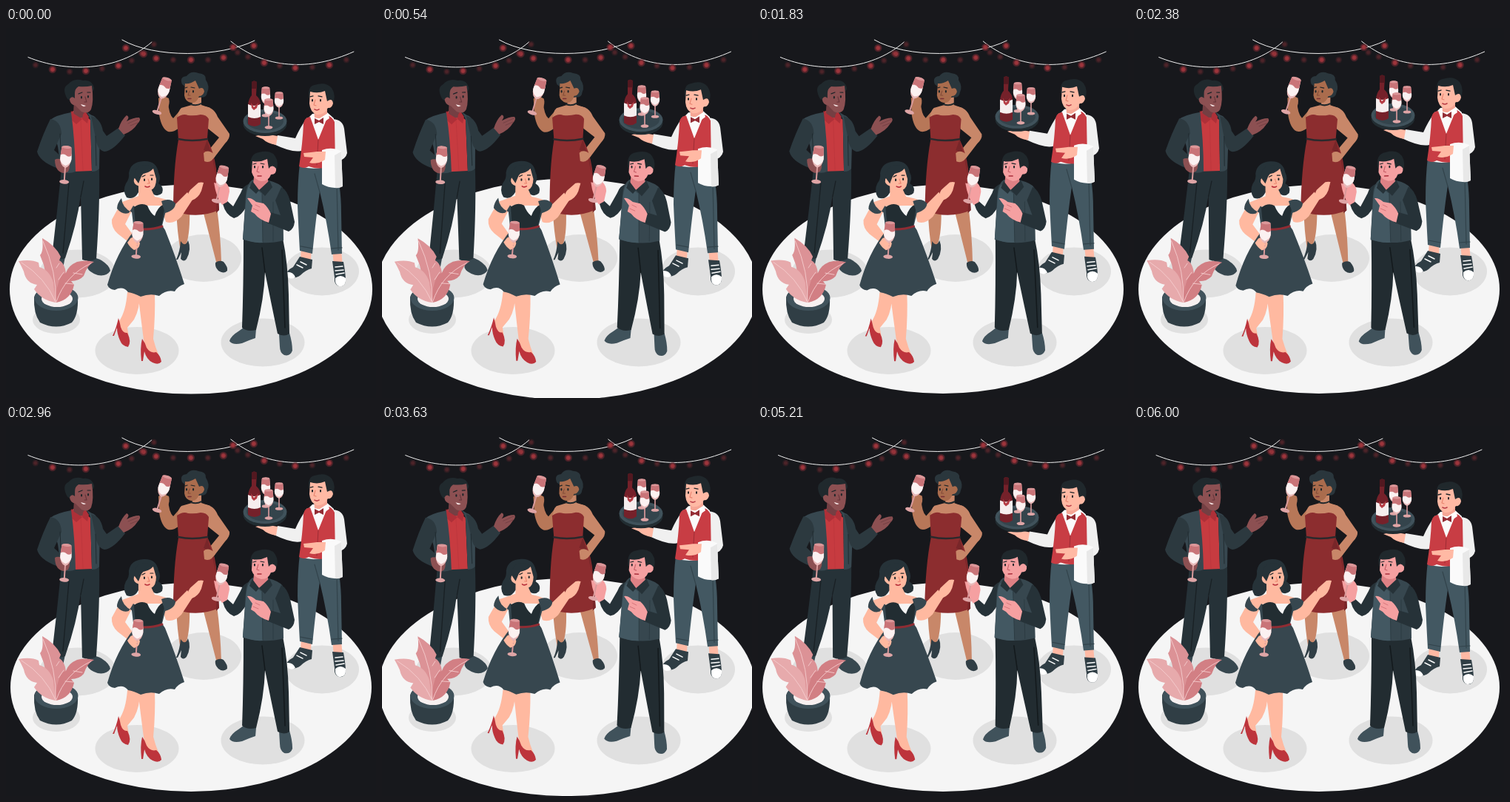
An HTML page that plays this animation: 500x500 px, repeating every 6.04 s.

```html
<!DOCTYPE html>
<html lang="en">
<head>
<meta charset="utf-8">
<title>Party</title>
<style>
html, body { margin: 0; width: 100%; height: 100%; overflow: hidden; background: #17181c; }
svg { display: block; width: 100%; height: 100%; }
.line { fill: none; stroke-linecap: round; stroke-linejoin: round; }
.ink { fill: none; stroke: #1c2428; stroke-linecap: round; }
</style>
</head>
<body>
<svg viewBox="0 0 500 500">
<defs>
  <radialGradient id="glow">
    <stop offset="0" stop-color="#a8383e"/>
    <stop offset=".5" stop-color="#8e3138"/>
    <stop offset=".65" stop-color="#702830" stop-opacity=".75"/>
    <stop offset="1" stop-color="#702830" stop-opacity=".4"/>
  </radialGradient>
  <g id="glass">
    <path d="M0 27V48" stroke="#d99a9b" stroke-width="2"/>
    <ellipse cy="48" rx="6.5" ry="2.8" fill="#dfa5a6"/>
    <path d="M-6.5 1L-7.8 16Q-7 27 0 29Q7 27 7.8 16L6.5 1Q0-2-6.5 1Z" fill="#e9b9b9"/>
    <path d="M-7.2 10Q0 13 7.2 10L7.6 18Q6 24 0 26Q-6 24-7.6 18Z" fill="#fbf1f1"/>
    <path d="M-6.5 1L-7.4 12Q-3 9 0 12T7.4 12L6.5 1Q0-2-6.5 1Z" fill="#c97478"/>
    <ellipse cy="1" rx="6.3" ry="2" fill="#dc9799"/>
  </g>
</defs>

<ellipse id="floor" cx="250" cy="353" rx="244" ry="141" fill="#f5f5f5"/>
<g fill="#e0e0e0">
  <ellipse cx="177" cy="436" rx="56.5" ry="32"/>
  <ellipse cx="347" cy="425" rx="56.5" ry="32.5"/>
  <ellipse cx="427" cy="329" rx="50" ry="32.5"/>
  <ellipse cx="267" cy="311" rx="51" ry="32"/>
  <ellipse cx="97" cy="332" rx="52" ry="32.5"/>
  <ellipse cx="68" cy="394" rx="32" ry="19"/>
</g>

<g id="garland">
  <g class="line" stroke="#f0f0f0" stroke-width="1">
    <path d="M30 39.500C80 60 150 60 197 19"/>
    <path d="M157 16C200 41 290 40 336 17"/>
    <path d="M304 18C350 55 410 59 470 32"/>
  </g>
  <g id="bulbs" fill="url(#glow)"></g>
</g>

<!-- man in the open jacket -->
<g id="host">
  <path d="M63 307L80 309L77 324L60 320Z" fill="#37474f"/>
  <path d="M110 312Q119 308 129 314Q140 321 141 328Q136 336 124 334Q112 330 110 324Z" fill="#37474f"/>
  <path d="M75 190L126 190Q127 240 122 312Q112 317 103 313L101 226Q96 265 80 311Q72 315 62 309Q69 250 75 190Z" fill="#263238"/>
  <path class="line" d="M101 228L105 207M85 210L77 304" stroke="#192024" stroke-width="1.300"/>
  <path d="M90 112L87 122L92 194L116 193L114 124L104 116Z" fill="#c73b40"/>
  <path class="line" d="M101 124L104 192" stroke="#b8343b" stroke-width=".6"/>
  <path d="M92 100L91 115Q95 123 104 121L108 110Z" fill="#743f43"/>
  <path d="M88 112L86 122L95 130L103 123L92 116Z" fill="#ae3038"/>
  <path d="M104 117L103 123L110 129L112 120L107 112Z" fill="#ae3038"/>
  <path d="M88 114Q67 118 60 124L70 160L75 194Q85 198 94 194Q93 150 88 114Z" fill="#37474f"/>
  <path d="M60 123Q50 143 42 167Q45 180 68 189L76 175L65 165L75 143Q74 125 60 123Z" fill="#2c393f"/>
  <path d="M108 113Q113 119 114 125L116 194Q123 194 126 190L127 135Q123 119 116 118Z" fill="#37474f"/>
  <path d="M115 119Q128 122 131 139L136 146L152 135L161 145Q145 166 133 167Q123 165 121 148Z" fill="#2c393f"/>
  <path class="line" d="M73 143L75 185M121 146L122 186" stroke="#202b30" stroke-width="1"/>
  <path d="M152 136Q156 124 163 118Q168 120 163 126Q172 121 180 121Q183 124 178 129Q172 139 159 144Z" fill="#8c5052"/>
  <path class="line" d="M165 129L179 123M168 132L178 128" stroke="#703e42" stroke-width=".8"/>
  <path d="M81 92Q76 80 84 76Q92 67 104 71Q116 69 119 81Q119 86 115 86L94 90L92 98Q84 100 81 92Z" fill="#20292d"/>
  <path d="M93 88Q93 82 98 79Q108 80 116 78Q119 99 115 110Q111 117 102 113L94 105Q86 103 86 96Q89 91 93 95Z" fill="#8c5052"/>
  <path class="ink" d="M98 89L103 87M110 87L114 87" stroke-width="1.200"/>
  <path class="ink" d="M102 93V94.500M111 92V93.500" stroke-width="2"/>
  <path class="line" d="M107 93L109 100L106 100" stroke="#643338" stroke-width="1"/>
  <path d="M101 103L108 105Q104 108 101 103Z" fill="#f6e5e5"/>
  <path d="M66 178Q71 174 84 182Q88 186 84 194Q77 199 70 192Q66 187 66 178Z" fill="#8c5052"/>
  <use href="#glass" transform="translate(82 160) rotate(4)"/>
</g>

<!-- lady in the red dress -->
<g id="lady">
  <path d="M230 243L248 243Q249 275 244 291L241 306L236 302Q231 275 230 243Z" fill="#c88769"/>
  <path d="M265 243L285 243Q290 280 291 317L285 320Q276 285 265 243Z" fill="#c88769"/>
  <path d="M236 288Q242 297 246 287Q251 299 244 312Q240 317 236 312L237 303L232 313H230Q235 302 236 288ZM283 317Q289 313 294 316Q300 323 299 328Q294 333 287 328Q282 323 283 317Z" fill="#303e45"/>
  <path d="M206 95Q213 89 219 99Q220 117 226 122L238 108L247 121Q230 143 219 140Q210 136 207 117Z" fill="#b77758"/>
  <path d="M253 96L251 104L237 108Q232 112 232 123L272 123L276 108L264 104L264 93Z" fill="#c88769"/>
  <path d="M268 106Q281 107 286 120L302 143Q303 149 296 156L280 177Q274 184 267 178L270 170L288 148L273 136Z" fill="#c88769"/>
  <path d="M231 121Q239 115 246 118Q255 119 263 117Q271 117 274 123L272 150Q281 168 284 190L288 246Q258 259 226 247Q226 190 233 151Z" fill="#8c2d2f"/>
  <path d="M267 165L279 170Q287 200 284 250L288 246Q287 198 272 151Z" fill="#782629"/>
  <path class="line" d="M233 150Q251 154 272 150" stroke="#2a292c" stroke-width="2.500"/>
  <path d="M267 169Q273 163 283 172Q277 184 268 180Z" fill="#c88769"/>
  <path class="line" d="M250 103Q257 106 264 102" stroke="#20282c" stroke-width="2"/>
  <path d="M238 76Q234 66 244 65Q250 57 260 61Q271 62 270 70Q276 79 272 87Q271 96 260 93L244 81Z" fill="#2a363c"/>
  <path d="M242 75Q248 76 256 71L261 82Q267 79 268 86Q266 92 261 92Q258 102 250 101Q242 99 241 91Z" fill="#aa6c4d"/>
  <path class="ink" d="M242 81L245 80M250 80L255 81" stroke-width="1.200"/>
  <path class="ink" d="M244 85V86.500M253 85V86.500" stroke-width="2"/>
  <path class="line" d="M248 85L246 91L249 91" stroke="#814a37" stroke-width="1"/>
  <path class="line" d="M246 95.500L250 95.500" stroke="#792f34" stroke-width="1.500"/>
  <path d="M207 95Q212 90 220 95Q222 102 218 109L208 111Z" fill="#b77758"/>
  <use href="#glass" transform="translate(218 68) rotate(17)"/>
</g>

<!-- waiter with tray -->
<g id="waiter">
  <path d="M399 296L413 298L412 313L398 312ZM441 300L453 300L455 322L443 320Z" fill="#ffb9a4"/>
  <path d="M397 309L414 313L413 325Q405 327 398 334Q388 341 379 335Q378 328 388 323ZM441 315L456 316Q459 332 459 342Q458 350 450 349Q443 347 444 337Z" fill="#303e45"/>
  <path d="M379 330Q388 329 391 337Q384 341 379 335ZM445 338Q452 332 459 338Q460 350 450 349Q444 347 445 338Z" fill="#fff"/>
  <path class="line" d="M393 320L401 324M398 316L406 320M445 323L455 322M445 328L456 327M446 333L457 331" stroke="#fff" stroke-width="1.500"/>
  <path d="M397 183L443 181Q453 210 453 250L454 305L440 306Q434 262 424 221Q419 255 414 305L397 301Q395 265 394 240Q394 208 397 183Z" fill="#435862"/>
  <path class="line" d="M424 222L417 197M447 211L449 300M398 295L414 298M440 298L454 297" stroke="#32434b" stroke-width="1.200"/>
  <path d="M407 121Q397 135 391 149L367 145L362 157Q387 169 399 166L412 146Z" fill="#f0f0f0"/>
  <path d="M442 123Q455 124 457 136L461 169Q459 178 448 180L431 176L434 166L443 163Z" fill="#f0f0f0"/>
  <path d="M414 116L434 114L443 122L441 184Q419 194 398 187L404 126Z" fill="#fafafa"/>
  <path d="M411 120Q403 121 402 129Q401 155 396 187Q403 191 409 187L416 189Q434 191 445 186L444 127Q440 119 435 119L422 151Z" fill="#c83d44"/>
  <path class="line" d="M422 151L420 185" stroke="#9d2c34" stroke-width="1"/>
  <path d="M416 109L417 121L426 123L434 118V108Z" fill="#f6a695"/>
  <path d="M414 116L417 123L424 122L435 115L437 122L427 129L415 127Z" fill="#fff"/>
  <path d="M417 122L423 125L429 121V130L423 127L417 130Z" fill="#942c34"/>
  <path d="M409 94Q408 78 417 77Q432 72 440 81Q447 91 441 104L432 111Z" fill="#20282c"/>
  <path d="M411 86Q422 89 431 85L434 99Q441 94 442 102Q440 109 435 108Q430 118 420 117Q411 114 410 102Z" fill="#ffb9a4"/>
  <path class="ink" d="M411 93L415 92M422 92L427 93" stroke-width="1.300"/>
  <path class="ink" d="M414 97V98.500M425 97V98.500" stroke-width="2"/>
  <path class="line" d="M418 97L416 104L419 105" stroke="#e7836e" stroke-width="1.100"/>
  <path class="line" d="M417 110Q420 112 423 110" stroke="#b93b45" stroke-width="1.600"/>
  <path d="M337 146Q349 142 367 146L365 158Q353 156 347 150Z" fill="#ffb9a4"/>
  <ellipse cx="350" cy="130" rx="29.500" ry="16" fill="#222d32"/>
  <ellipse cx="350" cy="126" rx="29.500" ry="16" fill="#40525b"/>
  <ellipse cx="350" cy="126" rx="25" ry="12.500" fill="#34444c"/>
  <path d="M332 73Q335 70 339 73L338 91Q344 96 344 104V130Q336 136 327 130V104Q328 95 332 91Z" fill="#75212a"/>
  <path d="M332 73Q335 70 339 73V82H332Z" fill="#521820"/>
  <path d="M327 103Q335 107 344 103V120Q336 124 327 120Z" fill="#f6eeee"/>
  <path d="M331 101L335 107L341 101L339 108L335 111L332 108Z" fill="#b63e46"/>
  <use href="#glass" transform="translate(351 80) scale(.8)"/>
  <use href="#glass" transform="translate(369 87) scale(.8 .72)"/>
  <use href="#glass" transform="translate(355 96) scale(.84 .8)"/>
  <path d="M427 165Q440 160 453 166L455 214Q441 219 427 211Z" fill="#fafafa"/>
  <path d="M444 172L453 167L455 214Q450 217 445 216Z" fill="#e8e8e8"/>
  <path d="M402 169Q413 168 420 167L432 167L431 178Q421 185 410 182L415 175L403 174Z" fill="#ffb9a4"/>
</g>

<!-- potted plant -->
<g>
  <path d="M38 364Q40 352 68 351Q97 352 97 364Q98 388 89 398Q68 409 46 398Q37 386 38 364Z" fill="#303e45"/>
  <ellipse cx="68" cy="365" rx="29.500" ry="17" fill="#40525b"/>
  <ellipse cx="69" cy="366" rx="21" ry="11" fill="#f7f0f0"/>
  <g id="leaves">
    <path d="M67 371Q60 364 58 346Q53 333 51 320L46 307Q51 302 49 284Q67 294 74 309L72 314Q83 320 81 346Q80 362 67 371Z" fill="#dc9296"/>
    <path d="M67 371Q48 368 38 353L42 347Q27 345 24 329Q20 320 17 315Q34 312 44 317L45 323Q59 327 64 344Z" fill="#e7aaac"/>
    <path d="M68 371Q66 349 76 333L81 331Q84 321 96 316Q108 313 119 316Q110 320 105 335Q99 342 88 342L92 347Q88 367 68 371Z" fill="#d27f84"/>
    <path class="line" d="M67 370Q69 330 50 288M67 370Q53 337 21 317M68 370Q80 334 115 318M71 340L78 330M68 324L72 318M80 345L91 346M91 331L103 333" stroke="#f5cdce" stroke-width=".9"/>
  </g>
</g>

<!-- guest in the dark dress -->
<g id="guest">
  <path d="M164 357L181 357Q181 380 173 394L164 405L166 417L156 415L153 396Q162 383 164 357ZM178 357L201 357Q202 388 199 420Q202 432 206 441L195 443Q188 432 186 421Q182 390 178 357Z" fill="#ffb9a0"/>
  <path d="M152 392Q154 398 155 404Q158 413 164 412Q170 424 165 431Q157 430 154 422Q150 413 150 405L146 416H144Q149 406 152 392ZM184 420Q188 425 190 432Q195 440 203 438Q209 443 210 451Q206 456 198 452Q190 448 187 437L185 450H183Q181 432 184 420Z" fill="#bd343c"/>
  <path d="M186 180Q203 179 206 195Q210 203 206 210Q214 215 211 223Q204 230 196 222L179 222Q173 233 163 229Q157 220 162 210Q167 204 166 196Q168 181 186 180Z" fill="#263238"/>
  <path d="M179 213L179 227Q168 231 157 235L149 248L143 259Q142 270 151 278L169 292L175 284L161 265L168 251L175 240L209 240L216 262Q226 266 237 255L252 232L245 222L228 239Q222 232 201 228L194 213Z" fill="#ffb9a0"/>
  <path d="M246 231Q245 221 251 217L260 209Q264 208 267 209L264 220Q260 230 251 233Z" fill="#ffb9a0"/>
  <path d="M156 230Q150 237 150 244Q157 253 166 250L172 240L200 262L214 240L216 247L211 267L215 273Q229 308 241 346Q232 349 228 356Q217 353 207 362Q195 358 182 363Q172 358 165 357Q158 348 147 354Q139 353 137 347Q149 304 173 274L170 249Q157 243 156 230Z" fill="#37474f"/>
  <path d="M173 242Q183 235 191 240Q195 250 201 254Q205 242 212 239L214 245L210 268Q191 273 175 269Z" fill="#222d32"/>
  <path d="M210 234Q222 229 229 237Q229 246 215 250Z" fill="#37474f"/>
  <path class="line" d="M174 271Q194 274 211 268" stroke="#8f2c33" stroke-width="3"/>
  <path d="M178 197Q192 198 199 190L203 204Q203 216 196 219Q187 223 180 214Q171 211 173 204Q175 200 178 204Z" fill="#ffb9a0"/>
  <path d="M174 203Q172 193 180 187Q192 183 198 189Q188 192 183 200L179 210Z" fill="#263238"/>
  <path class="ink" d="M184 201L188 199M195 199L199 199" stroke-width="1.200"/>
  <path class="ink" d="M187 204.500V206M197 203.500V205" stroke-width="2"/>
  <path class="line" d="M192 204L194 210L191 210" stroke="#e7826b" stroke-width="1"/>
  <path class="line" d="M188 214Q191 216 194 214" stroke="#b82f3b" stroke-width="1.600"/>
  <path d="M167 286Q170 280 179 286L181 291Q180 299 173 300Q167 296 164 290Z" fill="#ffb9a0"/>
  <use href="#glass" transform="translate(179 262) rotate(4) scale(.98)"/>
  <path class="line" d="M169 289L176 292M171 294L176 296" stroke="#ffb9a0" stroke-width="3.500"/>
</g>

<!-- friend in the waistcoat -->
<g id="friend">
  <path d="M321 405Q330 409 338 407L337 419Q328 422 319 426Q306 429 302 423Q304 416 314 410ZM369 413L383 412Q387 425 387 436Q384 444 376 442Q370 439 370 430Z" fill="#40525b"/>
  <path d="M321 284L374 284Q381 318 382 360L383 413Q376 418 367 413Q358 370 350 330Q349 365 338 408Q326 411 319 405Q321 350 321 284Z" fill="#222c31"/>
  <path class="line" d="M350 330L346 297M373 300L377 405" stroke="#13191c" stroke-width="1.500"/>
  <path d="M330 210Q320 213 317 223L307 241L298 233L293 238Q297 253 308 257Q318 255 326 239Z" fill="#263238"/>
  <path d="M333 205L355 206Q370 210 374 216L375 287Q350 294 320 286L324 226Q325 210 333 205Z" fill="#37474f"/>
  <path d="M329 212Q325 218 324 235L320 285Q333 291 347 290L346 224Z" fill="#435862"/>
  <path class="line" d="M346 224L347 289M361 235L361 288" stroke="#2d3c43" stroke-width="1"/>
  <path d="M335 201L334 211L342 219L355 211L353 200Z" fill="#df8185"/>
  <path d="M333 207L329 216L338 224L342 219ZM356 206L342 219L350 227L360 215Z" fill="#263238"/>
  <path d="M372 215Q380 219 384 234L390 262Q389 272 382 275L352 263L357 249L371 253L364 233Z" fill="#263238"/>
  <path d="M331 189Q328 170 342 168Q361 163 366 178Q369 189 362 197L352 203Z" fill="#20282c"/>
  <path d="M333 180Q343 182 353 177L355 190Q360 183 365 190Q366 198 358 198Q355 207 345 207Q335 205 332 195Z" fill="#f5a0a1"/>
  <path class="ink" d="M334 184L338 183M344 183L349 184" stroke-width="1.200"/>
  <path class="ink" d="M336 187V188.500M347 187V188.500" stroke-width="2"/>
  <path class="line" d="M341 187L339 194L342 195" stroke="#c75f68" stroke-width="1.100"/>
  <path class="line" d="M340 200H345" stroke="#a92e3b" stroke-width="1.500"/>
  <path d="M281 209Q288 210 289 214L297 209Q302 214 302 221L299 235L292 239Q284 229 281 209Z" fill="#f5a0a1"/>
  <use href="#glass" transform="translate(295 187) rotate(13)"/>
  <path d="M326 230Q331 229 338 235L348 237Q354 242 358 251L355 263Q342 259 336 251L331 248L333 240Z" fill="#f5a0a1"/>
  <path class="line" d="M337 239L343 242M334 244L341 247" stroke="#ce6b72" stroke-width=".8"/>
</g>
</svg>

<script>
const el = id => document.getElementById(id);

// Bulbs alternate between bright and dim along each string.
const strings = [
  [40, 50, 63, 56, 86, 59, 108, 58, 130, 55, 152, 51, 170, 44, 186, 35, 200, 22],
  [162, 27, 183, 34, 203, 41, 226, 43, 250, 43, 273, 43, 294, 40, 313, 33, 335, 24],
  [307, 26, 327, 39, 349, 47, 370, 51, 391, 54, 414, 53, 437, 50, 460, 43]
];
el('bulbs').innerHTML = strings.map((pts, s) => {
  let out = '';
  for (let i = 0; i < pts.length; i += 2) {
    const bright = (i / 2 % 2 === 0) === (s > 0);
    out += `<circle cx="${pts[i]}" cy="${pts[i + 1]}" r="${bright ? 5.3 : 4.5}" opacity="${bright ? 1 : 0.4}"/>`;
  }
  return out;
}).join('');

// Linear interpolation between keyframes.
function track(p, stops, values) {
  const i = Math.max(1, stops.findIndex(s => s >= p));
  const k = (p - stops[i - 1]) / (stops[i] - stops[i - 1]);
  return values[i - 1] + (values[i] - values[i - 1]) * k;
}

const tenths = [0, .1, .2, .3, .4, .5, .6, .7, .8, .9, 1];
const shake = p => track(p, tenths, [0, -1, 2, -4, 4, -4, 4, -4, 2, -1, 0]);
const beat = p => track(p, [0, .1, .3, .4, .5, .6, 1], [1, 1.1, 1, 1, 1.1, 1, 1]);
const wind = p => track(p, [0, .25, .75, 1], [0, 1, -1, 0]);

// id, direction, centre of rotation
const swaying = [
  ['host', -1, 111, 202],
  ['lady', -1, 250, 195],
  ['guest', 1, 202, 317],
  ['friend', 1, 334, 305],
  ['leaves', -1, 68, 328]
];

function draw(now) {
  const t = Math.min(now % 6040 + 12, 6000);
  const phase = period => t % period / period;
  const move = (id, value) => el(id).setAttribute('transform', value);

  move('garland', `translate(${shake(phase(1500))} 0)`);
  move('floor', `translate(250 353) scale(${beat(phase(3000))}) translate(-250 -353)`);
  move('waiter', `translate(0 ${-10 + 10 * Math.abs(1 - t / 3000)})`);
  for (const [id, dir, x, y] of swaying)
    move(id, `rotate(${dir * wind(phase(3000))} ${x} ${y})`);
}

const start = performance.now();
function frame() {
  draw(performance.now() - start);
  requestAnimationFrame(frame);
}
frame();
</script>
</body>
</html>
```
